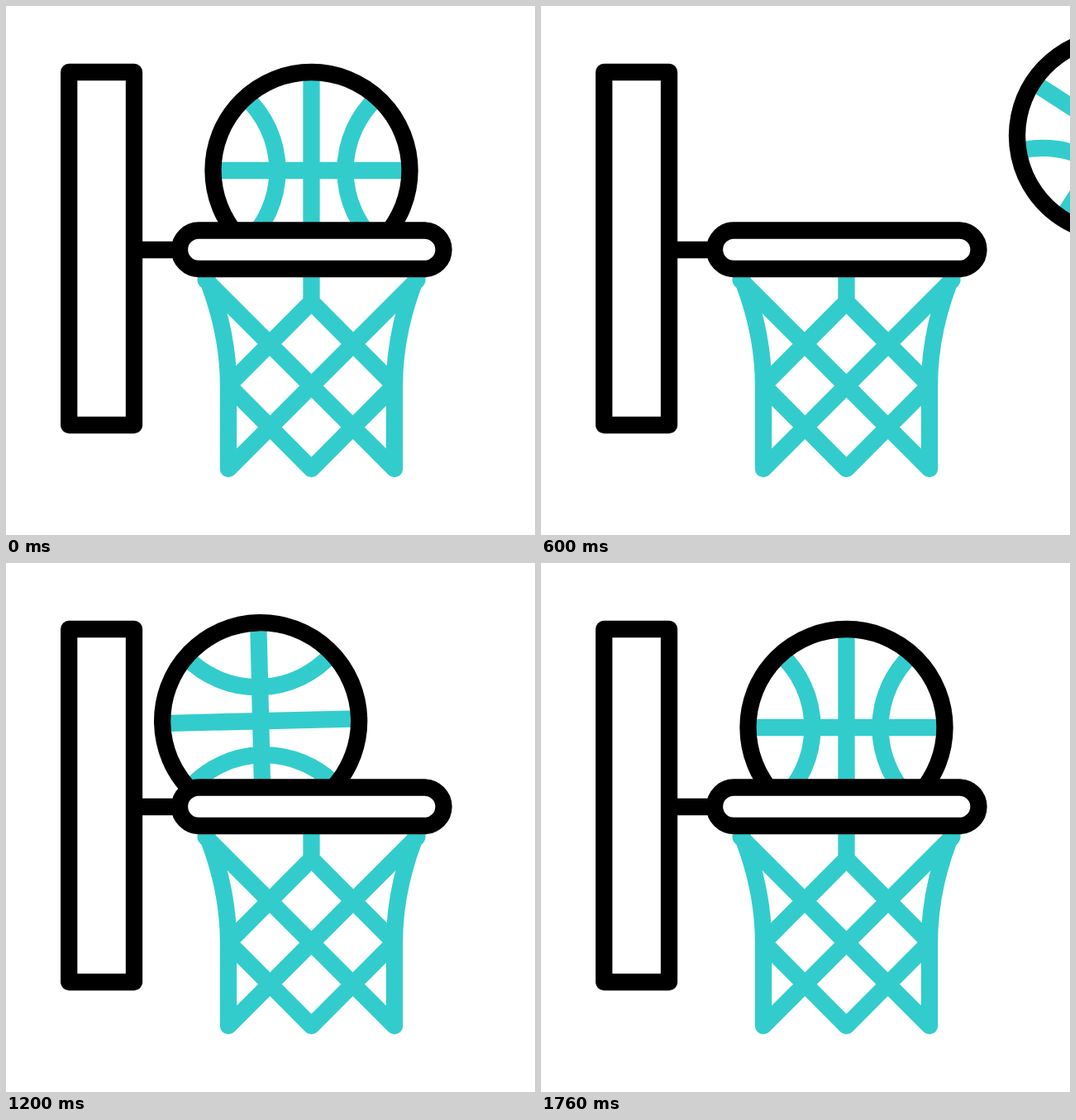
An HTML page that plays this animation: 640x640 px, repeating every 2 s.

```html
<!DOCTYPE html>
<html lang="en">
<head>
<meta charset="utf-8">
<title>Basketball hoop</title>
<style>
  html, body { margin: 0; height: 100%; overflow: hidden; background: #fff; }
  svg { display: block; width: 100vw; height: 100vh; }
  path, rect, circle { stroke-width: 20.3; stroke-linejoin: round; }
  .line { fill: none; stroke: #3cc; }
  .solid { fill: #fff; stroke: #000; }
  #net { stroke-linecap: round; }
</style>
</head>
<body>
<svg viewBox="0 0 640 640">
  <g id="ball">
    <circle r="119" fill="#fff"/>
    <path class="line" d="M-119 0H119M0-119V119M-79.5-88.5A121 121 0 0 1-79.5 88.5M79.5-88.5A121 121 0 0 0 79.5 88.5"/>
    <circle r="119" fill="none" stroke="#000"/>
  </g>
  <path id="net" class="line"/>
  <path d="M155 295H210" stroke="#000"/>
  <rect class="solid" x="76.2" y="80" width="78.8" height="427"/>
  <rect class="solid" x="210" y="271.5" width="319.5" height="46.5" rx="23.25"/>
</svg>
<script>
const LOOP = 2000, STEP = 40;
const DROP = 80, THROW = 540, HIT = 880, REST = 1760;
const CENTER = 369.5, TOP = 199, RIM = 190.8;
const ball = document.getElementById('ball');
const net = document.getElementById('net');

const clamp = u => Math.min(1, Math.max(0, u));
const mix = (a, b, u) => a + (b - a) * u;
const wave = u => (1 - Math.cos(Math.PI * clamp(u))) / 2;

// Falls through the hoop, flies in from the right, bounces off the board, rolls to the middle.
function ballPose(t) {
  if (t < THROW) {
    const fall = Math.max(0, t - DROP);
    return { x: CENTER, y: TOP + 0.00674 * fall ** 2, angle: 0.096 * fall };
  }
  const flight = Math.min(RIM, 92.2 + 0.00251 * (t - 760.6) ** 2);
  if (t < HIT) {
    const left = (HIT - t) / 280;
    return { x: mix(280.5, 695, left ** 1.35), y: flight, angle: mix(44, 123, left ** 1.15) };
  }
  const u = clamp((t - HIT) / (REST - HIT));
  return {
    x: mix(280.5, CENTER, wave(u * 1.035)),
    y: flight + (TOP - RIM) * u ** 3,
    angle: mix(44, 180, (u + wave(u)) / 2)
  };
}

// The net's outer corners move sideways by `bulge`.
function netPath(bulge) {
  const side = s => {
    const at = dx => CENTER + s * dx;
    const edge = at(100.5 + bulge);
    return `M${at(135.5 + bulge * 0.15)} 308Q${edge} 385 ${edge} 459V560L${at(-128)} 331.5`
      + `M${CENTER} 358L${edge} 459L${CENTER} 560`;
  };
  return `M${CENTER} 318V358` + side(-1) + side(1);
}

function draw() {
  const t = Math.floor((performance.now() - start) % LOOP / STEP) * STEP;
  const { x, y, angle } = ballPose(t);
  ball.setAttribute('transform', `translate(${x} ${y}) rotate(${angle})`);
  const pass = clamp((t - 100) / 320);
  net.setAttribute('d', netPath(18.5 * Math.sin(Math.PI * pass) ** 2));
  requestAnimationFrame(draw);
}

const start = performance.now();
draw();
</script>
</body>
</html>
```
